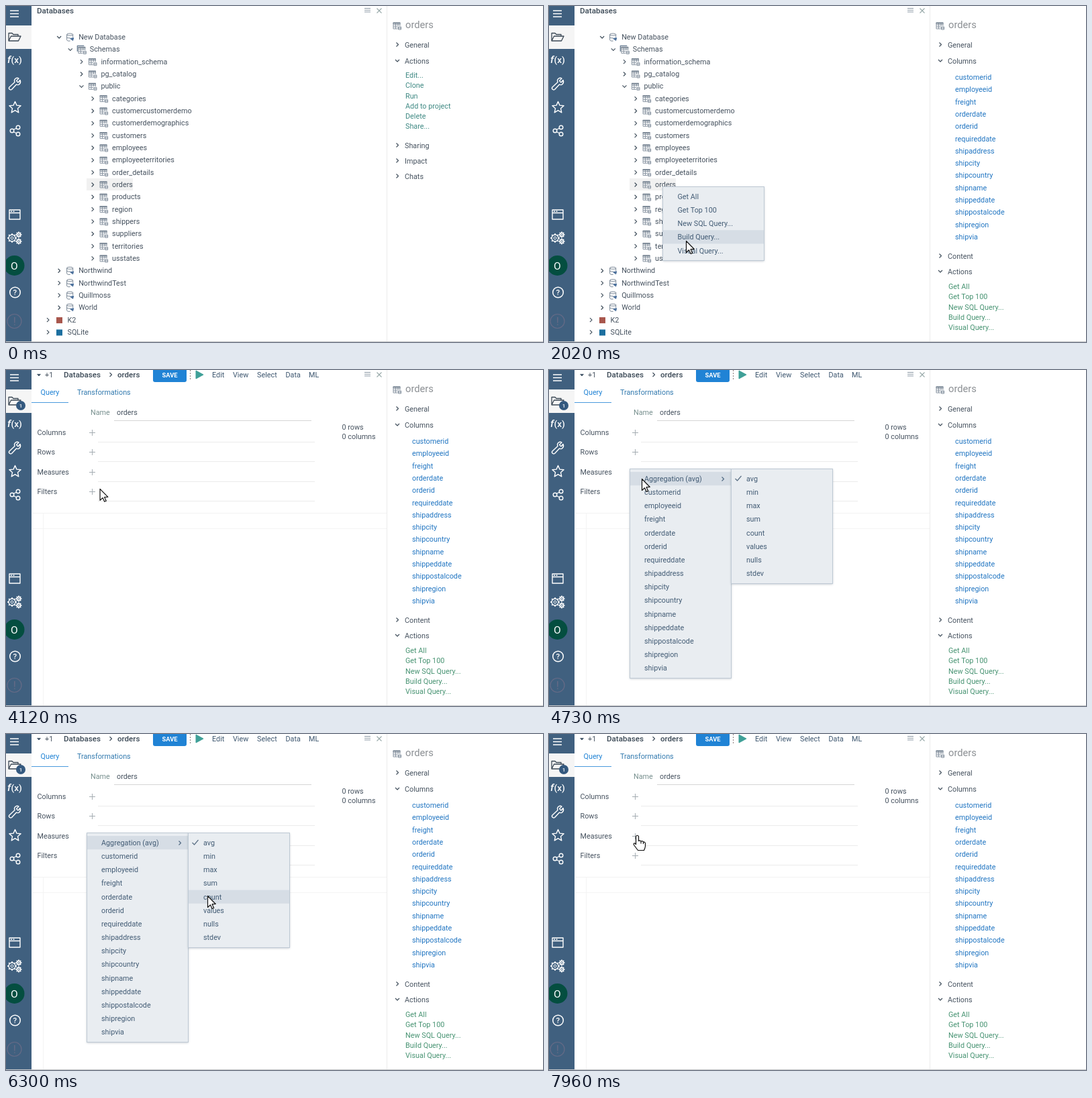
Write an HTML page with a canvas that moves like this. It is 800x501 px and loops after 8 s.

```html
<!DOCTYPE html>
<html lang="en">
<head>
<meta charset="utf-8">
<title>Visual query builder</title>
<style>
html, body { margin: 0; width: 100%; height: 100%; overflow: hidden; background: #fff; }
canvas { display: block; width: 800px; height: 501px; }
</style>
</head>
<body>
<canvas id="stage" width="800" height="501"></canvas>
<script>
const ctx = document.getElementById('stage').getContext('2d');
const LOOP = 8000, ROW = 18.33, MENU_ROW = 20.15;
const SLATE = '#40607f', INK = '#46525f', BLUE = '#2083d5';

// When each part of the interface changes, in ms
const AT = { context: 1350, picked: 2430, badge: 2530, form: 2630, named: 2840,
  statusEnd: 3580, loaded: 3720, hand: 4190, menu: 4520, sub: 4660, menuEnd: 7030, hand2: 7890 };

const COLUMNS = ('customerid employeeid freight orderdate orderid requireddate shipaddress ' +
  'shipcity shipcountry shipname shippeddate shippostalcode shipregion shipvia').split(' ');
const QUERIES = ['Get All', 'Get Top 100', 'New SQL Query...', 'Build Query...', 'Visual Query...'];
const EDITS = ['Edit...', 'Clone', 'Run', 'Add to project', 'Delete', 'Share...'];
const AGGREGATES = 'avg min max sum count values nulls stdev'.split(' ');
const TABLES = ('categories customercustomerdemo customerdemographics customers employees ' +
  'employeeterritories order_details orders products region shippers suppliers territories usstates').split(' ');

// depth, label, icon, open
const TREE = [
  [1, 'New Database', 'db', 1], [2, 'Schemas', 'schema', 1],
  [3, 'information_schema', 'table'], [3, 'pg_catalog', 'table'], [3, 'public', 'table', 1],
  ...TABLES.map(name => [4, name, 'table']),
  [1, 'Northwind', 'db'], [1, 'NorthwindTest', 'db'], [1, 'Quillmoss', 'db'], [1, 'World', 'db'],
  [0, 'K2', '#a8564c'], [0, 'SQLite', '#1c6f9f']
];

// time, x, y of the pointer tip
const PATH = [
  [70, 636, 2], [300, 560, 230], [560, 380, 440], [820, 234, 291], [890, 181, 279],
  [1350, 181, 279], [1470, 186, 291], [1550, 186, 291], [2015, 204, 350], [2080, 204, 350],
  [2090, 205, 358], [2230, 206, 362], [2840, 206, 362], [2960, 198, 353], [3650, 198, 353],
  [4190, 131, 151], [4650, 131, 151], [4725, 138, 162], [4790, 138, 162], [5000, 147, 165],
  [5330, 147, 165], [5730, 285, 160], [5900, 285, 162], [6295, 300, 241], [6365, 300, 241],
  [6630, 310, 249], [7030, 310, 249], [7300, 200, 127], [7560, 134, 149], [7880, 134, 149],
  [7890, 131, 151], [8000, 131, 151]
];

function pointerAt(t) {
  const i = PATH.findIndex(p => p[0] > t);
  if (i < 1) return { x: PATH[0][1], y: PATH[0][2] };
  const [a, b] = [PATH[i - 1], PATH[i]];
  const k = (t - a[0]) / (b[0] - a[0]);
  return { x: a[1] + (b[1] - a[1]) * k, y: a[2] + (b[2] - a[2]) * k };
}

// Drawing helpers
function text(s, x, y, color = INK, size = 10.8, weight = 400, family = 'Roboto') {
  ctx.font = `${weight} ${size}px ${family}, sans-serif`;
  ctx.fillStyle = color;
  ctx.fillText(s, x, y);
}
function rect(x, y, w, h, color) {
  ctx.fillStyle = color;
  ctx.fillRect(x, y, w, h);
}
function stroke(d, x, y, color, width = 1, fill) {
  const p = new Path2D(d);
  ctx.save();
  ctx.translate(x, y);
  if (fill) { ctx.fillStyle = fill; ctx.fill(p); }
  ctx.strokeStyle = color;
  ctx.lineWidth = width;
  ctx.lineJoin = 'round';
  ctx.stroke(p);
  ctx.restore();
}
function circle(x, y, r, fill, line, width = 1.5) {
  ctx.beginPath();
  ctx.arc(x, y, r, 0, 7);
  if (fill) { ctx.fillStyle = fill; ctx.fill(); }
  if (line) { ctx.strokeStyle = line; ctx.lineWidth = width; ctx.stroke(); }
}
function roundRect(x, y, w, h, r, color) {
  ctx.beginPath();
  ctx.roundRect(x, y, w, h, r);
  ctx.fillStyle = color;
  ctx.fill();
}
function chevron(x, y, open, color = '#44525f') {
  stroke(open ? 'M-3-1.5L0 1.5L3-1.5' : 'M-1.5-3L1.5 0L-1.5 3', x, y, color, 1.2);
}

function tableIcon(x, y) {
  stroke('M-5.5-4.5H4.5V4.5H-5.5ZM-5.5-1.5H4.5M-5.5 1.5H4.5M-2-4.5V4.5M1.5-4.5V4.5', x, y, '#8793a0');
  rect(x - 6, y - 5, 11, 2, '#7b8896');
  rect(x + 1, y, 6, 6, '#fff');
  stroke('M2 1.5H6V5.5H2ZM2 3.5H6', x, y, '#7f8c9a');
}
function dbIcon(x, y) {
  stroke('M-5-4C-5-6 4-6 4-4S-5-2-5-4V4C-5 5.5-2 6 0 5.5M4-4V0M-5 0C-5 1-2 1.5 0 1.2', x, y, '#768493');
  stroke('M0 2L5 1L4 5Z', x, y, '#4a6f9b', 1, '#4a6f9b');
}
function treeIcon(kind, x, y) {
  if (kind === 'db') dbIcon(x, y);
  else if (kind === 'table') tableIcon(x, y);
  else if (kind === 'schema') {
    stroke('M-6 3V-5.5H4', x, y, '#64798f', 1.2);
    tableIcon(x + 1, y + 1);
  } else rect(x - 4, y - 4, 9, 9, kind);
}

function drawTree() {
  text('Databases', 46, 11, '#3a4855', 11.6, 500);
  TREE.forEach(([depth, label, icon, open], i) => {
    const y = 46 + ROW * i, dx = depth * 16.65;
    if (label === 'orders') rect(120, y - 9, 69, 18, '#f1f1f1');
    chevron(62.5 + dx, y + 0.5, open);
    treeIcon(icon, 79 + dx, y + 0.5);
    text(label, 91.5 + dx, y + 4);
  });
}

function gear(x, y, r) {
  circle(x, y, r, null, '#fff', 1.3);
  circle(x, y, r * 0.4, null, '#fff', 1);
  for (let a = 0; a < 8; a++) {
    const c = Math.cos(a * Math.PI / 4), s = Math.sin(a * Math.PI / 4);
    stroke(`M${c * r} ${s * r}L${c * (r + 1.8)} ${s * (r + 1.8)}`, x, y, '#fff', 1.8);
  }
}

function drawSidebar(badge) {
  const white = '#fff';
  rect(0, 0, 38, 501, SLATE);
  rect(0, 29, 38, 35, '#f5f5f5');
  stroke('M0 0H13M0 4.5H13M0 9H13', 6, 7, white, 1.5);
  stroke('M1 13V1.5H6L8 3.5H15V6M1 13L4.5 6H19L15.5 13Z', 3, 39, '#3b4855', 1.3);
  if (badge) {
    circle(22, 53, 7, '#34597f');
    text('1', 19.8, 56, white, 8, 500);
  }
  text('f', 2, 85, white, 15, 'italic 500');
  text('(x)', 7.5, 85, white, 13.5, 500);
  stroke('M-8 5L0-2.5C-2-7 3-10 6-8L2.5-4.5L5-2L8-5.5C10-1 6 3 2.5 1L-4.5 8.5C-7 10-10 7-8 5Z', 13, 116, white, 1.4);
  let star = '';
  for (let i = 0; i < 10; i++) {
    const a = i * Math.PI / 5 - Math.PI / 2, r = i % 2 ? 4.2 : 9;
    star += `${i ? 'L' : 'M'}${r * Math.cos(a)} ${r * Math.sin(a)}`;
  }
  stroke(star + 'Z', 13.5, 151.5, white, 1.4);
  stroke('M5-5L-5 0L5 5', 13, 186, white, 1.3);
  for (const [x, y] of [[18, 181], [9, 186], [18, 191]]) circle(x, y, 2.8, SLATE, white, 1.4);
  stroke('M-8-7H8V7H-8ZM-8-2.5H8M-6-4.8H-4M-2.5-4.8H-.5', 13, 311, white, 1.4);
  gear(9, 346, 5);
  gear(19, 341, 2.6);
  gear(19, 351, 2.6);
  circle(12.5, 387, 15, '#044e40');
  text('O', 7, 392.5, white, 15.5);
  circle(13.5, 427, 7.8, null, white, 1.5);
  text('?', 10.6, 431.2, white, 11.5, 500);
  circle(12.5, 470, 10.5, null, '#666b87', 1.2);
  text('!', 10.7, 476, '#666b87', 16);
}

function links(list, x, y, step, color) {
  list.forEach((s, i) => text(s, x, y + step * i, color));
}
function section(label, y, open) {
  chevron(583, y - 0.5, open);
  text(label, 594, y + 4);
}

function drawPanel(columns) {
  rect(567, 0, 1, 501, '#ececec');
  stroke('M0 0H9M0 2.7H9M0 5.4H9', 534, 3.5, '#8d9aa6');
  stroke('M-3.5-3.5L3.5 3.5M3.5-3.5L-3.5 3.5', 556, 7, '#98a9a9', 1.1);
  tableIcon(582.5, 29.5);
  text('orders', 595, 33, '#8b8f93', 14.7);
  section('General', 58);
  if (columns) {
    section('Columns', 82, true);
    links(COLUMNS, 605, 110, 18.31, '#2276c2');
    section('Content', 373);
    section('Actions', 396, true);
    links(QUERIES, 595, 422, 15.3, '#479372');
  } else {
    section('Actions', 82, true);
    links(EDITS, 595, 107, 15.25, '#3f8983');
    section('Sharing', 208);
    section('Impact', 231);
    section('Chats', 254);
  }
}

function drawForm(t) {
  stroke('M-2.5-1.2H2.5L0 1.5Z', 49, 7.5, '#34485c', 0.6, '#34485c');
  text('+1', 58, 11);
  text('Databases', 86, 11, '#3a4855', 11.6, 500);
  chevron(156, 7);
  text('orders', 166, 11, '#3a4855', 11.6, 500);
  roundRect(219, -5, 50, 23, 3, BLUE);
  text('SAVE', 232.5, 10.5, '#fff', 9.3, 700);
  ctx.setLineDash([2, 2]);
  stroke('M0 0V15', 274.5, 0, '#8a7a7a');
  ctx.setLineDash([]);
  stroke('M0 0L11 6L0 12Z', 283, 1, '#3fa098', 1, '#3fa098');
  [['Edit', 307], ['View', 338], ['Select', 374], ['Data', 416.5], ['ML', 451]]
    .forEach(([s, x]) => text(s, x, 11, '#3d566f'));

  text('Query', 51.5, 37, BLUE);
  text('Transformations', 106, 37, '#3179ae');
  rect(38, 48, 55, 1, '#4a9add');

  text('Name', 126, 67, '#78908f');
  rect(161, 75, 294, 1, '#d5d5d5');
  if (t >= AT.named) text('orders', 165, 67);
  ['Columns', 'Rows', 'Measures', 'Filters'].forEach((s, i) => {
    const y = 93 + 29.3 * i;
    text(s, 46.5, y + 4);
    stroke('M-4.5 0H4.5M0-4.5V4.5', 128.5, Math.round(y) + 0.5, '#a5adb3');
    rect(137, Math.round(y + 14), 323, 1, '#ebebeb');
  });

  rect(39, 213, 528, 1, '#f3f3f3');
  rect(39, 236, 528, 1, '#f4f4f4');
  if (t >= AT.loaded) {
    rect(55, 213, 1, 288, '#f3f3f3');
    text('0 rows', 500.5, 89);
    text('0 columns', 500.5, 103);
  } else if (t >= AT.named) {
    [311, 318, 327.5].forEach((x, i) => {
      const phase = (t - 3030) / 160 + [-0.6, 0.55, 1.1][i];
      circle(x, 351, 2.2 + 0.9 * Math.sin(phase), null, '#5b9ac6', 1.3);
    });
  }
}

function drawMenu(x, y, w, h, items, textX, firstY, active, step = MENU_ROW) {
  ctx.save();
  ctx.shadowColor = 'rgba(60,80,100,.25)';
  ctx.shadowBlur = 3;
  ctx.shadowOffsetY = 1;
  roundRect(x, y, w, h, 2, '#e9edf1');
  ctx.restore();
  if (active >= 0 && active < items.length) rect(x, firstY - 10 + step * active, w, step, '#d6dde5');
  ctx.strokeStyle = '#bec9d4';
  ctx.lineWidth = 1;
  ctx.strokeRect(x + 0.5, y + 0.5, w - 1, h - 1);
  items.forEach((s, i) => text(s, textX, firstY + 4 + step * i, '#435c75'));
}

function drawMenus(t, p) {
  if (t >= AT.context && t < AT.picked) {
    const active = Math.max(0, Math.floor((p.y - 273.5) / 20.25));
    drawMenu(169, 269, 152, 111, QUERIES, 191.5, 283.5, active, 20.25);
  }
  if (t < AT.menu || t >= AT.menuEnd) return;
  const sub = t >= AT.sub;
  drawMenu(120, 147, 152, 313, ['Aggregation (avg)', ...COLUMNS], 142, 162, sub ? 0 : -1);
  chevron(259, 162.5, false, '#526b83');
  if (!sub) return;
  const active = p.x >= 272 ? Math.floor((p.y - 152) / MENU_ROW) : -1;
  drawMenu(271, 147, 152, 172, AGGREGATES, 294, 162, active);
  stroke('M-4.5 0L-1.5 3L4.5-4', 282, 162, '#5c7186', 1.2);
}

function drawStatus() {
  roundRect(-4, 478, 278, 27, 3, 'rgba(150,208,220,.36)');
  text('Waiting for public.datagrok.ai...', -3, 497, '#a9c3c9', 14, 300, '"Open Sans"');
}

function drawPointer(t, { x, y }) {
  if (t < PATH[0][0]) return;
  const hand = (t >= AT.hand && t < AT.sub) || t >= AT.hand2;
  const shape = hand
    ? 'M-2 1Q0-1.5 2 1V8Q4 6.5 5.5 8.5Q8 7.5 9 9.5Q11.5 9 12 11.5V16Q11.5 19 10 22H1Q-2 18-5 14Q-6 11-3.5 11.5L-2 13ZM5.5 8.5V12M9 9.5V12.5'
    : 'M0 0V17L4 13.3L6.7 19L9.2 18L6.6 12.2L11.8 12Z';
  stroke(shape, x + 0.5, y + 0.5, '#111', 1.2, '#fff');
}

function draw(t) {
  const p = pointerAt(t);
  rect(0, 0, 800, 501, '#fff');
  if (t < AT.form) drawTree();
  else drawForm(t);
  drawSidebar(t >= AT.badge);
  drawPanel(t >= AT.context);
  rect(0, 500, 800, 1, '#c4c6c8');
  if (t >= AT.named && t < AT.statusEnd) drawStatus();
  drawMenus(t, p);
  drawPointer(t, p);
}

const start = performance.now();
function tick() {
  draw((performance.now() - start) % LOOP);
  requestAnimationFrame(tick);
}
tick();
</script>
</body>
</html>
```
